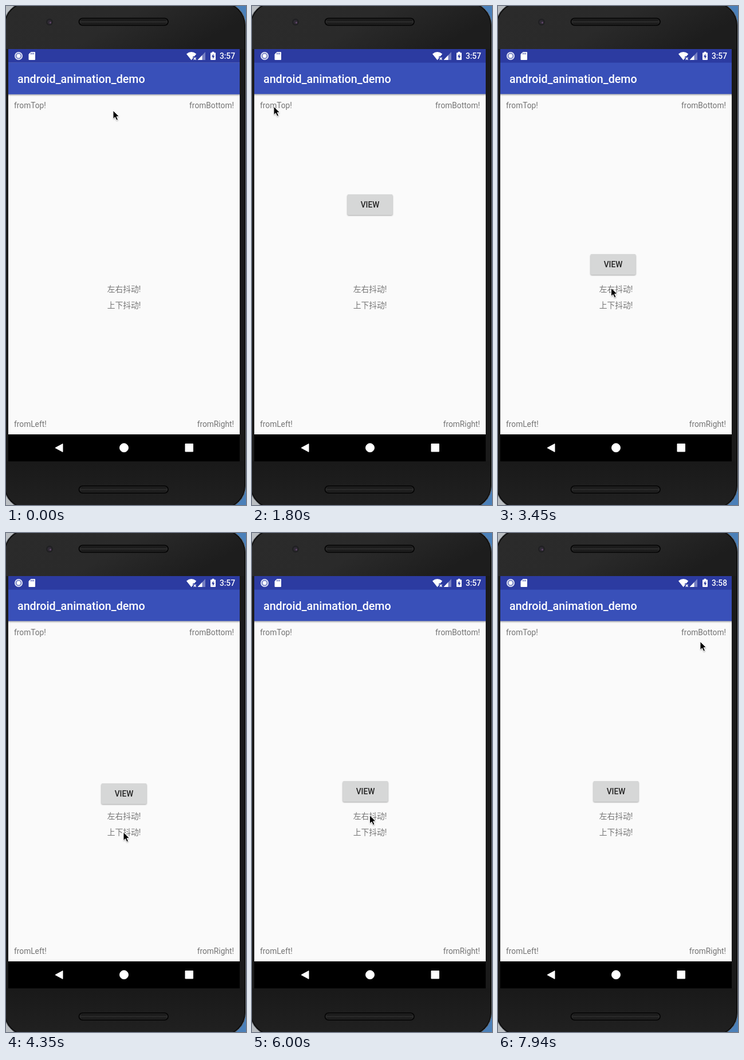
An HTML page that plays this animation: 419x869 px, repeating every 8 s.

```html
<!DOCTYPE html>
<html lang="zh-CN">
<head>
<meta charset="utf-8">
<title>android_animation_demo</title>
<style>
  html, body { margin: 0; width: 100%; height: 100%; overflow: hidden; background: #4b80b9; }
  svg { display: block; width: 419px; height: 869px; }
  text { font-family: Roboto, "Noto Sans CJK SC", "Noto Sans CJK", sans-serif; font-size: 13.75px; }
  .label { fill: #747474; }
  .medium { font-weight: 500; }
  .end { text-anchor: end; }
  .mid { text-anchor: middle; }
</style>
</head>
<body>
<svg viewBox="0 0 419 869" xmlns="http://www.w3.org/2000/svg">
  <defs>
    <linearGradient id="top" x1="0" y1="0" x2="1" y2=".35">
      <stop offset="0" stop-color="#2b2b2b"/>
      <stop offset=".55" stop-color="#2a2a2a"/>
      <stop offset="1" stop-color="#1d1d1d"/>
    </linearGradient>
    <linearGradient id="low" x1="0" y1="0" x2="0" y2="1">
      <stop offset="0" stop-color="#191919"/>
      <stop offset="1" stop-color="#212121"/>
    </linearGradient>
    <linearGradient id="slot" x1="0" y1="0" x2="0" y2="1">
      <stop offset="0" stop-color="#0b0b0b"/>
      <stop offset=".5" stop-color="#2c2c2c"/>
      <stop offset="1" stop-color="#0e0e0e"/>
    </linearGradient>
    <linearGradient id="fade" x1="0" y1="0" x2="0" y2="1">
      <stop offset="0" stop-color="#000" stop-opacity=".32"/>
      <stop offset="1" stop-color="#000" stop-opacity="0"/>
    </linearGradient>
    <clipPath id="body"><rect x="-3" y="-6" width="421" height="881" rx="40"/></clipPath>
    <clipPath id="page"><rect x="4" y="153.5" width="404" height="592.5"/></clipPath>
    <filter id="blur" x="-50%" y="-50%" width="200%" height="200%"><feGaussianBlur stdDeviation="1"/></filter>
    <g id="speaker">
      <rect x="126.5" width="157.5" height="14" rx="7" fill="#070707"/>
      <rect x="129" y="2.5" width="152.5" height="9" rx="4.5" fill="url(#slot)" stroke="#393939" stroke-width=".8"/>
    </g>
  </defs>

  <rect width="60" height="869" fill="#b9bdc1"/>
  <g clip-path="url(#body)">
    <rect x="-3" y="-6" width="421" height="881" fill="#1a1a1a"/>
    <rect x="-3" y="-6" width="421" height="81" fill="url(#top)"/>
    <rect x="-3" y="793" width="421" height="82" fill="url(#low)"/>
  </g>
  <rect x="-2.5" y="-5.5" width="420" height="880" rx="39.5" fill="none" stroke="#0c0c0c" stroke-width="2.5"/>
  <rect x="-3.5" y="-6.5" width="422" height="882" rx="40.5" fill="none" stroke="#777b80"/>
  <circle cx="76" cy="28" r="6" fill="#202022"/>
  <circle cx="76" cy="28" r="3.6" fill="#302b35"/>
  <circle cx="77.5" cy="29" r="1.5" fill="#62496d"/>
  <use href="#speaker" y="20.5"/>
  <use href="#speaker" y="835"/>

  <rect x="4" y="75" width="404" height="718" fill="#fafafa"/>

  <g clip-path="url(#page)">
    <g class="label">
      <text class="label" x="14" y="178">fromTop!</text>
      <text class="label end" x="398" y="178">fromBottom!</text>
      <text class="label mid" x="206" y="498">左右抖动!</text>
      <text class="label mid" x="206" y="526">上下抖动!</text>
      <text class="label" x="14" y="732.5">fromLeft!</text>
      <text class="label end" x="398" y="732.5">fromRight!</text>
    </g>
    <g id="button">
      <rect x="166.5" y="1.5" width="79" height="35.5" rx="2" fill="#000" opacity=".35" filter="url(#blur)"/>
      <rect x="166.5" width="79" height="36" rx="2" fill="#d6d7d7"/>
      <text class="medium mid" x="206" y="23" fill="#222">VIEW</text>
    </g>
  </g>

  <g id="bar">
    <rect x="4" y="153" width="404" height="4" fill="url(#fade)"/>
    <rect x="4" y="98" width="404" height="55.3" fill="#3950b9"/>
    <text class="medium" x="20" y="133.5" fill="#fff" style="font-size:19.7px">android_animation_demo</text>
  </g>
  <rect x="4" y="75" width="404" height="23.7" fill="#2c3ba1"/>

  <g fill="#fff">
    <circle cx="22" cy="87" r="6.2" fill="#7783c6" stroke="#e8eaf7" stroke-width="1.6"/>
    <circle cx="22" cy="87" r="3.4"/>
    <path d="M43.5 80H50q1 0 1 1V93q0 1-1 1H40.500q-1 0-1-1V84Z"/>
    <path d="M43.700 81.500v2.800M46 81.500v2.800M48.300 81.500v2.800" stroke="#2c3ba1"/>
    <path d="M315 83.400Q323.500 76.800 332.300 83.400L328.800 87.800H326.300V91L323.600 94.200Z"/>
    <path d="M327.700 89.700l4 4m0-4l-4 4" stroke="#fff" stroke-width="1.300"/>
    <path d="M348 80V94H334.500Z" opacity=".35"/>
    <path d="M342.500 85.800V94H334.500Z"/>
    <path d="M359.700 81.300V79.800h3.600v1.500H365q1 0 1 1V93q0 1-1 1h-7q-1 0-1-1V82.300q0-1 1-1Z"/>
    <path d="M362.300 83.200L358.900 88.500H361V92.300L364.200 87H362.300Z" fill="#2c3ba1"/>
    <text id="clock" class="medium end" x="400" y="92">3:57</text>
  </g>

  <rect x="4" y="746" width="404" height="47" fill="#000"/>
  <g fill="#fff" stroke="#fff" stroke-linejoin="round">
    <path d="M86 769.500L99 762.500V776.500Z"/>
    <circle cx="206" cy="769.300" r="7.500"/>
    <rect x="313" y="762.500" width="13.500" height="13.500"/>
  </g>

  <g id="cursor">
    <path d="M0 1V16l3.500-3 2.500 5.500 3-1.300-2.500-5.200H11Z" fill="#000" opacity=".35" filter="url(#blur)"/>
    <path d="M0 0V14.600L3.400 11.500 5.900 17 8.500 15.900 6.100 10.500H10.600Z" fill="#000" stroke="#fff" stroke-width="1" stroke-linejoin="round"/>
  </g>
</svg>
<script>
const LOOP = 8000, TICK = 150;
const REST = 432;
const $ = id => document.getElementById(id);

// time, x, y of the pointer tip
const path = [
  [0, 187, 182], [150, 170, 181], [300, 120, 178], [450, 72, 176], [600, 45, 175],
  [750, 38, 175], [1950, 38, 175], [2100, 66, 245], [2250, 150, 456], [2400, 206, 506],
  [2550, 205, 503], [2700, 200, 495], [2850, 197.5, 491], [3600, 197.5, 491],
  [3900, 208, 533], [4050, 205, 521], [4500, 205, 521], [4800, 206.5, 504],
  [5100, 205.5, 491.5], [6300, 205.5, 491.5], [6450, 204, 508], [6600, 202.5, 520.5],
  [7500, 202.5, 520.5], [7650, 228, 450], [7790, 292, 299], [7940, 353, 189]
];

// start, axis, offset at each tick
const shakes = [
  [3150, 'x', [3, 7, -5, 2]],
  [4350, 'y', [4, 8, -11]],
  [5700, 'x', [4, -3, -8, 2]],
  [6750, 'y', [5, 9, -10.5, 3]]
];

const snap = t => t >= 7940 ? 7940 : t >= 7790 ? 7790 : Math.floor(t / TICK) * TICK;

function pointer(t) {
  const i = path.findIndex(p => p[0] >= t);
  const b = path[i], a = path[Math.max(0, i - 1)];
  const k = b === a ? 0 : (t - a[0]) / (b[0] - a[0]);
  return [a[1] + (b[1] - a[1]) * k, a[2] + (b[2] - a[2]) * k];
}

function bounce(p) {
  const x = p * 1.1226;
  const arc = (mid, low) => 8 * (x - mid) ** 2 + low;
  if (x < 0.3535) return arc(0, 0);
  if (x < 0.7408) return arc(0.54719, 0.7);
  if (x < 0.9644) return arc(0.8526, 0.9);
  return arc(1.0435, 0.95);
}

function button(t) {
  const p = Math.min(1, Math.max(0, (t - 1200) / 985));
  const pos = { x: 0, y: p < 1 ? REST - 690 * (1 - bounce(p)) : REST };
  for (const [start, axis, steps] of shakes) {
    if (t >= start) pos[axis] += steps[Math.round((t - start) / TICK)] || 0;
  }
  return [pos.x, pos.y];
}

const move = (id, [x, y]) => $(id).setAttribute('transform', `translate(${x} ${y})`);

const origin = performance.now();
function draw() {
  const t = snap((performance.now() - origin) % LOOP);
  move('cursor', pointer(t));
  move('button', button(t));
  move('bar', [0, t < TICK ? 0.5 : 0]);
  $('clock').textContent = t >= 7940 ? '3:58' : '3:57';
  requestAnimationFrame(draw);
}
draw();
</script>
</body>
</html>
```
